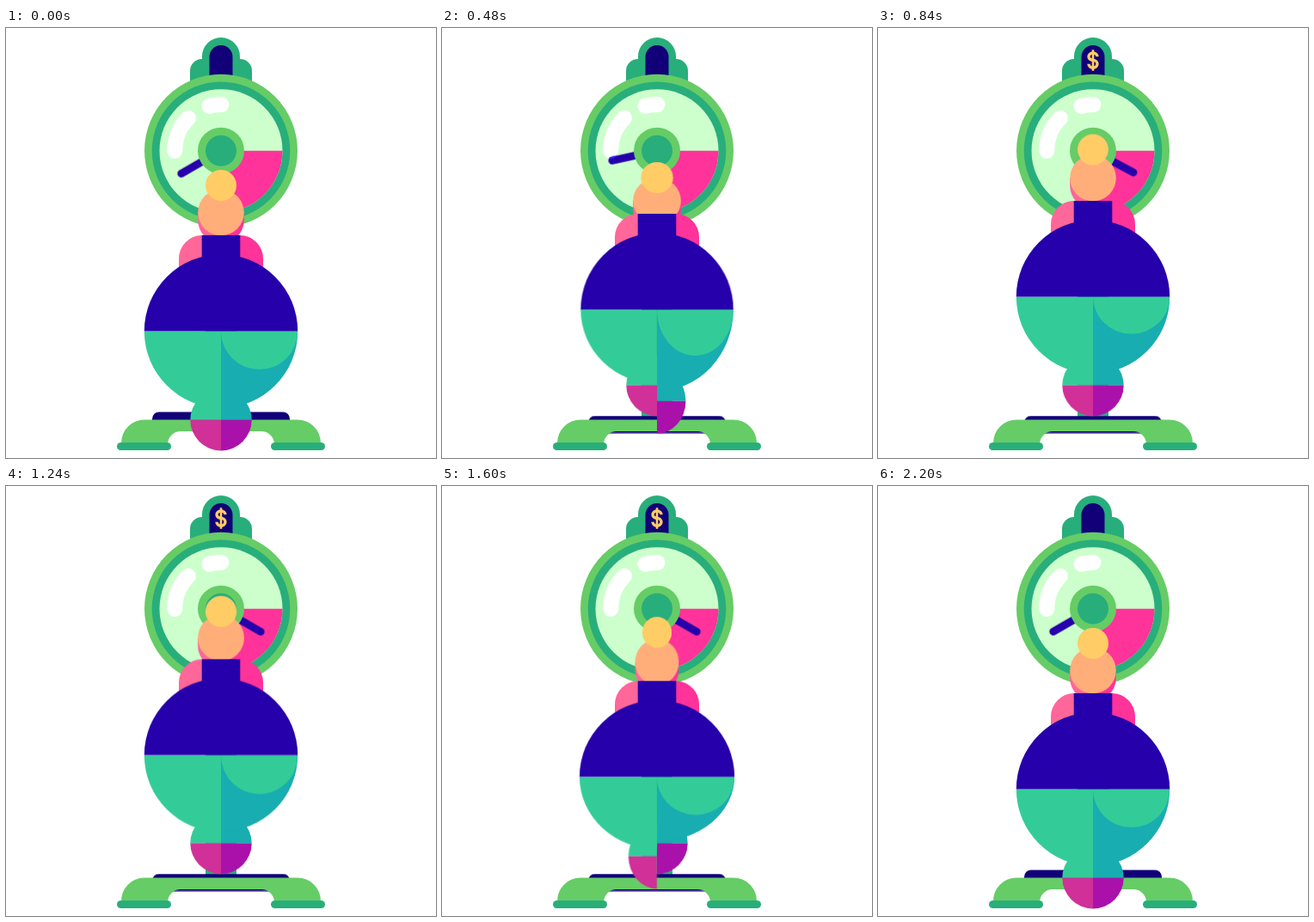
Recreate the animation shown at these times as an HTML page without scripts. Size 500 by 500 pixels, loop 2.4 s.

```html
<!DOCTYPE html>
<html lang="en">
<head>
<meta charset="utf-8">
<title>Weighing scale</title>
<style>
html, body { margin: 0; width: 100%; height: 100%; overflow: hidden; background: #fff; }
svg { display: block; width: 100%; height: 100%; }

.lime { fill: #66cc66; }
.green { fill: #28ae7b; }
.navy { fill: #110077; }
.blue { fill: #2600aa; }
.rose { fill: #ff6699; }
.pink { fill: #ff3399; }
.mint { fill: #33cc99; }
.teal { fill: #18adb0; }

/* every moving part shares one 2.4 s clock */
.move { animation: 2400ms ease-in-out infinite; }
.needle { animation-name: needle; transform-origin: 250px 142.7px; }
.coin { animation-name: coin; }
.plate { animation-name: plate; }
.body { animation-name: body; }
.head { animation-name: head; transform-origin: 250px 214.5px; }
.bun { animation-name: bun; }
.disc, .hipL, .hipR, .fold { transform-origin: 250px 352.5px; }
.disc { animation-name: disc; }
.hipL { animation-name: hipL; }
.hipR { animation-name: hipR; }
.fold { animation-name: fold; }
.legL, .legR { transform-origin: 250px 455.7px; }
.legL { animation-name: legL; }
.legR { animation-name: legR; }

@keyframes needle {
  0%, 16.67% { transform: rotate(150deg); animation-timing-function: cubic-bezier(.4, 0, .35, 1); }
  36.9%, 66.67% { transform: rotate(390deg); animation-timing-function: cubic-bezier(.4, 0, .35, 1); }
  86.9%, 100% { transform: rotate(150deg); }
}
@keyframes coin {
  0%, 24.2% { opacity: 0; }
  30%, 70.8% { opacity: 1; }
  76.67%, 100% { opacity: 0; }
}
@keyframes plate {
  0%, 11.67% { transform: none; }
  16.67%, 68.33% { transform: translateY(4.5px); }
  73.33%, 100% { transform: none; }
}
@keyframes body {
  0%, 100% { transform: none; }
  6.67% { transform: translateY(3px); }
  15% { transform: translateY(-22px); }
  20% { transform: translateY(-25px); }
  26.67% { transform: translateY(-41px); }
  35%, 50% { transform: translateY(-40px); }
  56.67% { transform: translateY(-37px); }
  66.67% { transform: translateY(-14.3px); }
  71.67% { transform: translateY(-11px); }
  78.33% { transform: translateY(-2px); }
  83.33% { transform: none; }
}
@keyframes head {
  0%, 100% { transform: none; }
  6.67% { transform: translateY(13px) scaleX(1.04); }
  15% { transform: translateY(4px) scaleX(.95); }
  20% { transform: translateY(11.5px) scaleX(1.04); }
  27% { transform: translateY(-2px) scaleX(.95); }
  35%, 50% { transform: none; }
  56.67% { transform: translateY(13.5px) scaleX(1.04); }
  66.67% { transform: translateY(4.5px) scaleX(.95); }
  71.67% { transform: translateY(10px) scaleX(1.03); }
  78.33% { transform: none; }
}
@keyframes bun {
  0%, 100% { transform: none; }
  6.67% { transform: translateY(4.5px); }
  15% { transform: translateY(-3px); }
  20% { transform: translateY(4.5px); }
  27% { transform: translateY(-4px); }
  35% { transform: translateY(-1.5px); }
  41.67%, 50% { transform: none; }
  56.67% { transform: translateY(4.5px); }
  66.67% { transform: translateY(-3px); }
  71.67% { transform: translateY(3px); }
  78.33% { transform: translateY(-2px); }
  85% { transform: none; }
}
@keyframes disc {
  0%, 6.67%, 100% { transform: none; }
  11.67% { transform: scaleX(1.05); }
  16.67% { transform: none; }
  20% { transform: scaleX(.995); }
  25% { transform: scaleX(1.03); }
  31.67%, 56.67% { transform: none; }
  61.67% { transform: scaleX(1.05); }
  66.67% { transform: scaleX(1.01); }
  71.67% { transform: none; }
  75% { transform: scaleX(1.025); }
  78.33% { transform: scaleX(.995); }
  82% { transform: none; }
}
@keyframes hipL {
  0%, 5%, 100% { transform: none; }
  10% { transform: scaleY(.88); }
  20% { transform: scaleY(.965); }
  27%, 57% { transform: none; }
  66.67% { transform: scaleY(.94); }
  72% { transform: scaleY(1.06); }
  78.33% { transform: scaleY(1.03); }
  84% { transform: none; }
}
@keyframes hipR {
  0%, 6%, 100% { transform: none; }
  15% { transform: scaleY(1.1); }
  20% { transform: scaleY(1.06); }
  24% { transform: scaleY(.95); }
  30%, 50% { transform: none; }
  56.67% { transform: scaleY(.97); }
  66.67% { transform: scaleY(.84); }
  78.33% { transform: scaleY(.91); }
  84% { transform: none; }
}
@keyframes fold {
  0%, 100% { transform: none; }
  6.67% { transform: scaleY(1.1); }
  14% { transform: none; }
  20% { transform: scaleY(1.2); }
  27% { transform: scaleY(.92); }
  35% { transform: scaleY(.97); }
  41%, 50% { transform: none; }
  56.67% { transform: scaleY(1.1); }
  66.67% { transform: scaleY(.99); }
  78.33% { transform: scaleY(.92); }
  85% { transform: none; }
}
@keyframes legL {
  0%, 3.33%, 100% { transform: none; animation-timing-function: ease-in; }
  8.33% { transform: translateY(-22px) scale(.93, 1.06); animation-timing-function: ease-out; }
  13.5% { transform: translateY(-44.5px); }
  18%, 51% { transform: translateY(-40.3px); }
  56.67% { transform: translateY(-44.5px); }
  60.5% { transform: translateY(-43px); animation-timing-function: ease-in; }
  66.67% { transform: translateY(-25.5px) scale(.93, 1.06); animation-timing-function: ease-out; }
  71.5% { transform: none; }
}
@keyframes legR {
  0%, 14.5%, 100% { transform: none; animation-timing-function: ease-in; }
  20% { transform: translateY(-21.5px) scale(.935, 1.06); animation-timing-function: ease-out; }
  23.33%, 67.5% { transform: translateY(-40.3px); }
  71.67% { transform: translateY(-44px); animation-timing-function: ease-in; }
  78.33% { transform: translateY(-25.3px) scale(.93, 1.06); animation-timing-function: ease-out; }
  83.33% { transform: none; }
}
</style>
</head>
<body>
<svg viewBox="0 0 500 500">
  <defs>
    <g id="shine" fill="none" stroke="#fff" stroke-width="18" stroke-linecap="round">
      <path d="M196.3 143A53.7 53.7 0 0 1 212 104.7"/>
      <path d="M236.5 90.7A53.7 53.7 0 0 1 250.5 89"/>
    </g>
    <mask id="glint" maskUnits="userSpaceOnUse" x="0" y="0" width="500" height="500">
      <use href="#shine"/>
    </mask>
    <path id="hand" d="M250 142.7H303.3" stroke-width="9" stroke-linecap="round"/>
  </defs>

  <!-- sign on top -->
  <path class="green" d="M214 62V50a14 14 0 0 1 14-14V33a22 22 0 0 1 44 0v3a14 14 0 0 1 14 14v12z"/>
  <path class="navy" d="M236.5 56V33.5a13.5 13.5 0 0 1 27 0V56z"/>
  <g class="move coin" fill="none" stroke="#ffcc66">
    <path stroke-width="3.4" d="M255 33.2A5 4.2 0 1 0 250 37.4A5 4.4 0 1 1 245 41.8"/>
    <path stroke-width="2.6" d="M250 25.3V49.8"/>
  </g>

  <!-- dial -->
  <rect class="green" x="232" y="220" width="36" height="240"/>
  <circle class="lime" cx="250" cy="142.7" r="89"/>
  <circle class="green" cx="250" cy="142.7" r="80.3"/>
  <circle cx="250" cy="142.7" r="71.5" fill="#ccffcc"/>
  <path class="pink" d="M250 142.7h71.5a71.5 71.5 0 0 1-71.5 71.5z"/>
  <use href="#shine"/>
  <use class="move needle" href="#hand" stroke="#2600aa"/>
  <g mask="url(#glint)"><use class="move needle" href="#hand" stroke="#2424ff"/></g>
  <circle class="lime" cx="250" cy="142.7" r="27"/>
  <circle class="green" cx="250" cy="142.7" r="18"/>

  <!-- base -->
  <rect class="navy move plate" x="170" y="446.5" width="160" height="20" rx="8"/>
  <path class="lime" d="M134 484v-1.500a27 27 0 0 1 27-27H339a27 27 0 0 1 27 27V484H312a15 15 0 0 0-15-15H203a15 15 0 0 0-15 15z"/>
  <rect class="green" x="129" y="482" width="63" height="9" rx="4.5"/>
  <rect class="green" x="308" y="482" width="63" height="9" rx="4.5"/>

  <!-- person -->
  <g class="move legL">
    <path class="mint" d="M250 420a35.700 35.700 0 0 0-35.700 35.700H250z"/>
    <path fill="#d03098" d="M214.300 455.700a35.700 35.700 0 0 0 35.700 35.700v-35.700z"/>
  </g>
  <g class="move legR">
    <path class="teal" d="M250 420a35.700 35.700 0 0 1 35.700 35.700H250z"/>
    <path fill="#aa11aa" d="M285.700 455.700a35.700 35.700 0 0 1-35.700 35.700v-35.700z"/>
  </g>
  <g class="move body">
    <g class="move head">
      <path class="rose" d="M250 214.500H223.200V223.500A26.800 26.800 0 0 0 250 250.300z"/>
      <path class="pink" d="M250 214.500H276.800V223.500A26.800 26.800 0 0 1 250 250.300z"/>
      <circle cx="250" cy="214.500" r="26.800" fill="#ffae7a"/>
      <circle class="move bun" cx="250" cy="183" r="18" fill="#ffcc66"/>
    </g>
    <path class="rose" d="M250 300H201V268a27 27 0 0 1 27-27H250z"/>
    <path class="pink" d="M250 300H299V268a27 27 0 0 0-27-27H250z"/>
    <rect class="blue" x="227.700" y="241" width="44.600" height="50"/>
    <g class="move disc">
      <path class="mint move hipL" d="M250 352.500H160.800A89.200 89.200 0 0 0 250 441.700z"/>
      <path class="teal move hipR" d="M250 352.500H339.200A89.200 89.200 0 0 1 250 441.700z"/>
      <path class="mint move fold" d="M250 352.500a44.600 44.600 0 0 0 89.200 0z"/>
      <path class="blue" d="M160.800 352.500a89.200 89.200 0 0 1 178.400 0z"/>
    </g>
  </g>
</svg>
</body>
</html>
```
